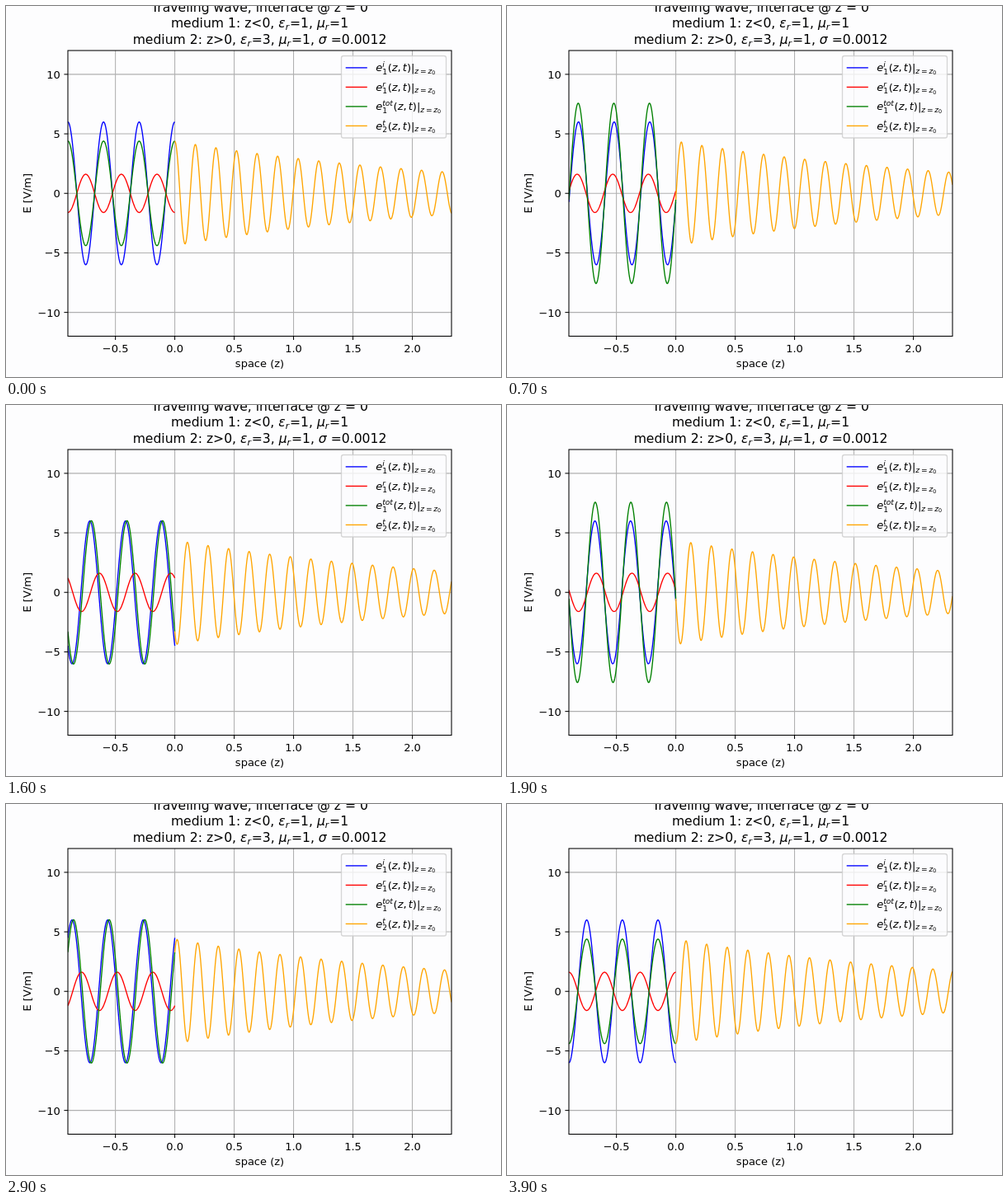
Write an HTML page with a canvas that moves like this. It is 600 by 450 pixels and loops after 4 s.

```html
<!DOCTYPE html>
<html lang="en">
<head>
<meta charset="utf-8">
<title>Traveling wave</title>
<style>
  html, body { margin: 0; width: 100%; height: 100%; overflow: hidden; background: #fdfdfe; }
  canvas { display: block; }
</style>
</head>
<body>
<canvas id="stage" width="600" height="450"></canvas>
<script>
const ctx = document.getElementById('stage').getContext('2d');
const BG = '#fdfdfe';
const box = { left: 75, right: 540, top: 54, bottom: 400.5 };
const midX = 307.5, midY = 227.25;
const px = z => 204.6 + 143.95 * z;
const py = e => midY - 14.4375 * e;

const STEP = 100, STEPS = 40;
const TAU = 2 * Math.PI;
const K1 = TAU / 0.3, K2 = K1 * Math.sqrt(3);
const E0 = 6, ALPHA = 0.392;
const GAMMA = (1 - Math.sqrt(3)) / (1 + Math.sqrt(3));

const incident = (z, p) => E0 * Math.cos(p - K1 * z);
const reflected = (z, p) => GAMMA * E0 * Math.cos(p + K1 * z);
const waves = [
  { color: '#0000ff', sup: 'i', sub: '1', from: -0.9, to: 0, field: incident },
  { color: '#ff0000', sup: 'r', sub: '1', from: -0.9, to: 0, field: reflected },
  { color: '#008000', sup: 'tot', sub: '1', from: -0.9, to: 0,
    field: (z, p) => incident(z, p) + reflected(z, p) },
  { color: '#ffa500', sup: 't', sub: '2', from: 0, to: 2.33,
    field: (z, p) => (1 + GAMMA) * E0 * Math.exp(-ALPHA * z) * Math.cos(p - K2 * z) },
];

// Text runs: scale and shift are in em, gap is extra space after the run.
const run = (text, opts) => ({ text, italic: false, scale: 1, shift: 0, gap: 0, ...opts });
const it = (text, opts) => run(text, { italic: true, ...opts });
const sub = (text, opts) => run(text, { scale: 0.7, shift: 0.2, ...opts });

function drawRuns(runs, x, y, size, align = 0) {
  const setFont = r =>
    ctx.font = `${r.italic ? 'italic ' : ''}${size * r.scale}px "DejaVu Sans", sans-serif`;
  const widths = runs.map(r => (setFont(r), ctx.measureText(r.text).width));
  const advance = i => runs[i].overlay ? 0 : widths[i] + runs[i].gap * size;
  x -= align * runs.reduce((sum, r, i) => sum + advance(i), 0);
  ctx.fillStyle = '#000';
  runs.forEach((r, i) => {
    setFont(r);
    ctx.fillText(r.text, x, y + r.shift * size);
    x += advance(i);
  });
}

const label = (text, x, y, align) => drawRuns([run(text)], x, y, 13.02, align);

function line(x1, y1, x2, y2, color, width) {
  ctx.strokeStyle = color;
  ctx.lineWidth = width;
  ctx.beginPath();
  ctx.moveTo(x1, y1);
  ctx.lineTo(x2, y2);
  ctx.stroke();
}

const number = (v, digits) => v.toFixed(digits).replace('-', '\u2212');
const xTicks = [-0.5, 0, 0.5, 1, 1.5, 2];
const yTicks = [-10, -5, 0, 5, 10];

function drawGrid() {
  for (const z of xTicks) line(px(z), box.top, px(z), box.bottom, '#b0b0b0', 1.05);
  for (const e of yTicks) line(box.left, py(e), box.right, py(e), '#b0b0b0', 1.05);
}

function drawWave({ color, from, to, field }, phase) {
  ctx.strokeStyle = color;
  ctx.lineWidth = 1.35;
  ctx.lineJoin = 'round';
  ctx.beginPath();
  const n = Math.ceil((to - from) * 300);
  for (let i = 0; i <= n; i++) {
    const z = from + (to - from) * i / n;
    ctx.lineTo(px(z), py(field(z, phase)));
  }
  ctx.stroke();
}

function drawAxes() {
  ctx.strokeStyle = '#000';
  ctx.lineWidth = 1.05;
  ctx.strokeRect(box.left, box.top, box.right - box.left, box.bottom - box.top);
  for (const z of xTicks) {
    line(px(z), box.bottom, px(z), box.bottom + 4.6, '#000', 1.05);
    label(number(z, 1), px(z), 419.5, 0.5);
  }
  for (const e of yTicks) {
    line(box.left - 4.6, py(e), box.left, py(e), '#000', 1.05);
    label(number(e, 0), 65.9, py(e) + 4.9, 1);
  }
  label('space (z)', midX, 437.8, 0.5);
  ctx.save();
  ctx.translate(30.2, midY);
  ctx.rotate(-Math.PI / 2);
  label('E [V/m]', 0, 0, 0.5);
  ctx.restore();
}

function drawTitle() {
  const r = it('r', { scale: 0.7, shift: 0.16, gap: 0.05 });
  const medium = (head, eps, tail) =>
    [run(head), it('ε'), r, run(`=${eps}, `), it('μ'), r, run('=1'), ...tail];
  drawRuns([run('Traveling wave, interface @ z = 0')], midX, 7.2, 15.625, 0.5);
  drawRuns(medium('medium 1: z<0, ', 1, []), midX, 26, 15.625, 0.5);
  drawRuns(medium('medium 2: z>0, ', 3, [run(', '), it('σ'), run(' =0.0012')]),
    midX, 46.3, 15.625, 0.5);
}

function drawLegend() {
  ctx.beginPath();
  ctx.roundRect(406.5, 60.5, 127, 99.5, 2.6);
  ctx.globalAlpha = 0.8;
  ctx.fillStyle = BG;
  ctx.fill();
  ctx.strokeStyle = '#ccc';
  ctx.lineWidth = 1.3;
  ctx.stroke();
  ctx.globalAlpha = 1;
  waves.forEach((w, i) => {
    const y = 74.9 + 23.5 * i;
    line(411.7, y, 437.8, y, w.color, 1.35);
    const wide = w.sup.length > 1;
    drawRuns([
      it('e'),
      it(w.sup, { scale: 0.7, shift: -0.4, overlay: !wide, gap: 0.05 }),
      sub(w.sub, { shift: 0.26, overlay: wide, gap: 0.05 }),
    ].sort((a, b) => !!b.overlay - !!a.overlay).sort((a, b) => (b.text === 'e') - (a.text === 'e'))
      .concat([
        run('('), it('z'), run(',', { gap: 0.16 }), it('t'), run(')'), run('|'),
        sub('z', { italic: true, gap: 0.14 }), sub('=', { gap: 0.14 }),
        sub('z', { italic: true }), sub('0', { scale: 0.49, shift: 0.31 }),
      ]), 448.2, y + 4.4, 13.02);
  });
}

function draw(now) {
  const step = Math.floor(now / STEP) % STEPS;
  const phase = 1.5 * TAU * step / (STEPS - 1);
  ctx.fillStyle = BG;
  ctx.fillRect(0, 0, 600, 450);
  drawGrid();
  ctx.save();
  ctx.beginPath();
  ctx.rect(box.left, box.top, box.right - box.left, box.bottom - box.top);
  ctx.clip();
  waves.forEach(w => drawWave(w, phase));
  ctx.restore();
  drawAxes();
  drawTitle();
  drawLegend();
}

function tick() {
  draw(performance.now());
  requestAnimationFrame(tick);
}
tick();
</script>
</body>
</html>
```
